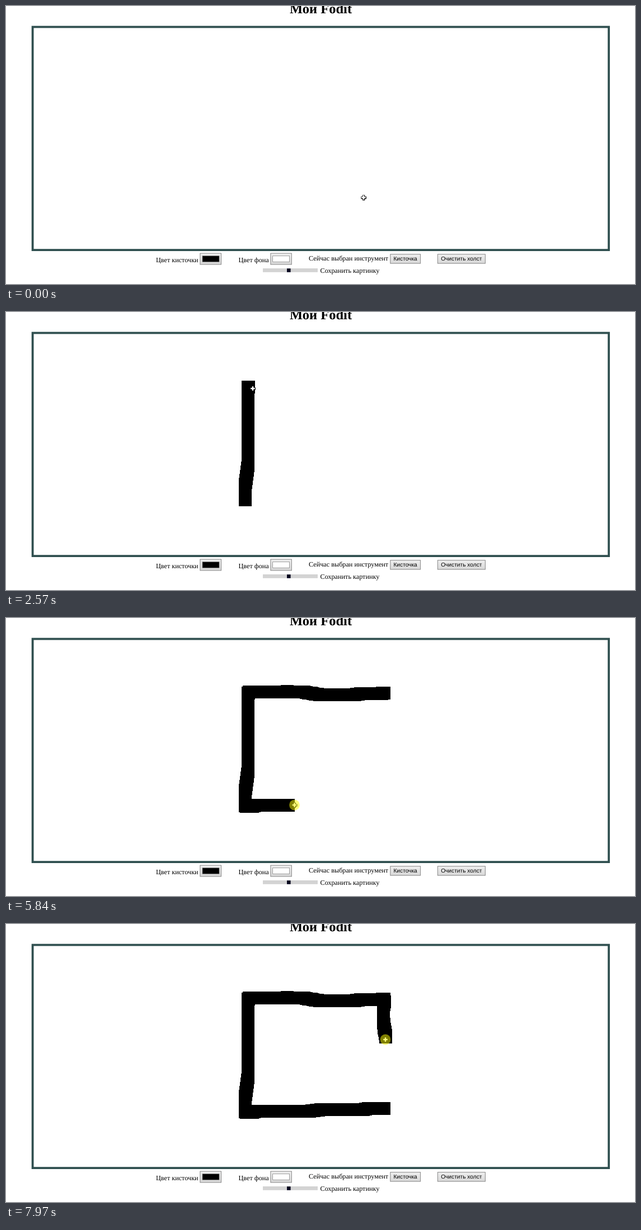
Write an HTML page with a canvas that moves like this. It is 1124 px wide and 498 px high and loops after 8 s.

```html
<!DOCTYPE html>
<html lang="ru">
<head>
<meta charset="utf-8">
<title>Мой Fodit</title>
<style>
  html, body { margin: 0; width: 100%; height: 100%; overflow: hidden; background: #fff; }
  svg, canvas { position: absolute; left: 0; top: 0; display: block; }
  .label { font: 12.2px "Liberation Serif", "Times New Roman", serif; }
  .title { font: bold 24.5px "Liberation Serif", "Times New Roman", serif; text-anchor: middle; }
  .caption { font: 10.2px "Liberation Sans", Arial, sans-serif; text-anchor: middle; }
  .button { fill: url(#face); stroke: #858585; }
  text { text-rendering: geometricPrecision; }
</style>
</head>
<body>
<svg width="1124" height="498">
  <defs>
    <linearGradient id="face" x1="0" y1="0" x2="0" y2="1">
      <stop offset="0" stop-color="#efefef"/>
      <stop offset="1" stop-color="#d8d8d8"/>
    </linearGradient>
  </defs>
  <text class="title" x="562.5" y="13">Мой Fodit</text>
  <rect x="47.6" y="37.5" width="1029.6" height="399.6" fill="#fff" stroke="#2f4f4f" stroke-width="3.8"/>

  <text class="label" x="268" y="458.5">Цвет кисточки</text>
  <rect class="button" x="346.9" y="443" width="37.6" height="20"/>
  <rect x="351" y="447.7" width="30" height="10.6" stroke="#777" stroke-width=".8"/>

  <text class="label" x="415.5" y="458.5">Цвет фона</text>
  <rect class="button" x="472.9" y="443" width="37.4" height="20"/>
  <rect x="476.6" y="447.7" width="30" height="10.6" fill="#fff" stroke="#888" stroke-width=".8"/>

  <text class="label" x="541" y="456">Сейчас выбран инструмент</text>
  <rect class="button" x="686.8" y="444.7" width="53.8" height="16.4"/>
  <text class="caption" x="713.6" y="456.4">Кисточка</text>
  <rect class="button" x="771.4" y="444.7" width="85" height="16.4"/>
  <text class="caption" x="813.8" y="456.4">Очистить холст</text>

  <rect x="459" y="470" width="98" height="6.8" fill="#d3d3d3"/>
  <rect x="502" y="470.2" width="6.6" height="6.6" fill="#05051e"/>
  <text class="label" x="561.5" y="478">Сохранить картинку</text>
</svg>
<canvas id="stage" width="1124" height="498"></canvas>
<script>
const ctx = document.getElementById("stage").getContext("2d");
const LOOP = 8000, BRUSH = 23, LAG = 36, TICK = 16;

// pointer path: time, x, y
const path = [
  [30, 639, 343], [640, 433, 134], [700, 433, 134], [810, 432.5, 157],
  [1010, 432, 189], [1350, 432.5, 266], [1470, 429.5, 295], [1520, 428, 306],
  [1620, 427.5, 327], [1700, 427, 336.5], [1780, 427, 336.5],
  [2050, 470, 230], [2250, 497, 78], [2450, 457, 134], [2570, 441, 137],
  [2880, 434, 132], [3080, 434, 132],
  [3510, 528, 132], [3580, 546, 135], [3660, 565, 137.5], [3900, 621, 137.5],
  [3950, 631, 136], [4150, 672, 135], [4300, 675, 134], [4480, 675, 134],
  [4690, 510, 295], [5210, 433, 336], [5380, 433, 336],
  [5440, 429, 337.5], [5520, 440, 337.5], [5570, 450, 335.5], [5840, 515.5, 335],
  [5950, 545, 335], [6010, 560, 333], [6170, 609.5, 332.5], [6250, 635, 332.5],
  [6320, 655, 330], [6420, 675, 330], [6560, 675, 330],
  [6780, 713, 260], [6990, 706, 186], [7300, 676, 139], [7440, 676, 139],
  [7560, 674.5, 152], [7720, 674.5, 172], [7850, 676.5, 190],
  [7920, 678.3, 202], [7970, 678, 207]
];

// button press intervals
const strokes = [[700, 1780], [3080, 4400], [5380, 6560], [7440, LOOP]];

const slope = (i, c) => {
  const a = path[i], b = path[i + 1];
  return a && b ? (b[c] - a[c]) / (b[0] - a[0]) : 0;
};

// monotone tangent, flat at turning points and rests
const tangent = (i, c) => {
  const p = slope(i - 1, c), q = slope(i, c);
  return p * q > 0 ? 2 * p * q / (p + q) : 0;
};

function pointer(t) {
  const last = path.length - 1;
  if (t <= path[0][0]) return path[0].slice(1);
  if (t >= path[last][0]) return path[last].slice(1);
  const i = path.findIndex(k => k[0] > t) - 1;
  const a = path[i], b = path[i + 1], d = b[0] - a[0];
  const u = (t - a[0]) / d, v = 1 - u;
  return [1, 2].map(c =>
    a[c] * (1 + 2 * u) * v * v + b[c] * u * u * (3 - 2 * u) +
    d * u * v * (tangent(i, c) * v - tangent(i + 1, c) * u));
}

function paintStroke(start, end, t) {
  for (let s = start; s <= Math.min(end, t - LAG); s += TICK) {
    const [x, y] = pointer(s);
    ctx.fillRect(Math.round(x - BRUSH / 2), Math.round(y - BRUSH / 2), BRUSH, BRUSH);
  }
}

function plus(x, y, arm, half, color) {
  ctx.fillStyle = color;
  ctx.fillRect(x - arm, y - half, 2 * arm, 2 * half);
  ctx.fillRect(x - half, y - arm, 2 * half, 2 * arm);
}

function draw(t) {
  ctx.clearRect(0, 0, 1124, 498);
  ctx.fillStyle = "#000";
  for (const [start, end] of strokes) paintStroke(start, end, t);

  const [x, y] = pointer(t);
  plus(x + .2, y + .4, 4.8, 2.2, "#000");
  plus(x, y, 3.8, 1.2, "#fff");
  if (strokes.some(([start, end]) => t >= start && t < end)) {
    ctx.fillStyle = "rgba(255, 255, 0, .5)";
    ctx.beginPath();
    ctx.arc(x, y, 9.4, 0, 2 * Math.PI);
    ctx.fill();
  }
}

let origin;
function frame(now) {
  origin ??= now;
  draw((now - origin) % LOOP);
  requestAnimationFrame(frame);
}
draw(0);
requestAnimationFrame(frame);
</script>
</body>
</html>
```
